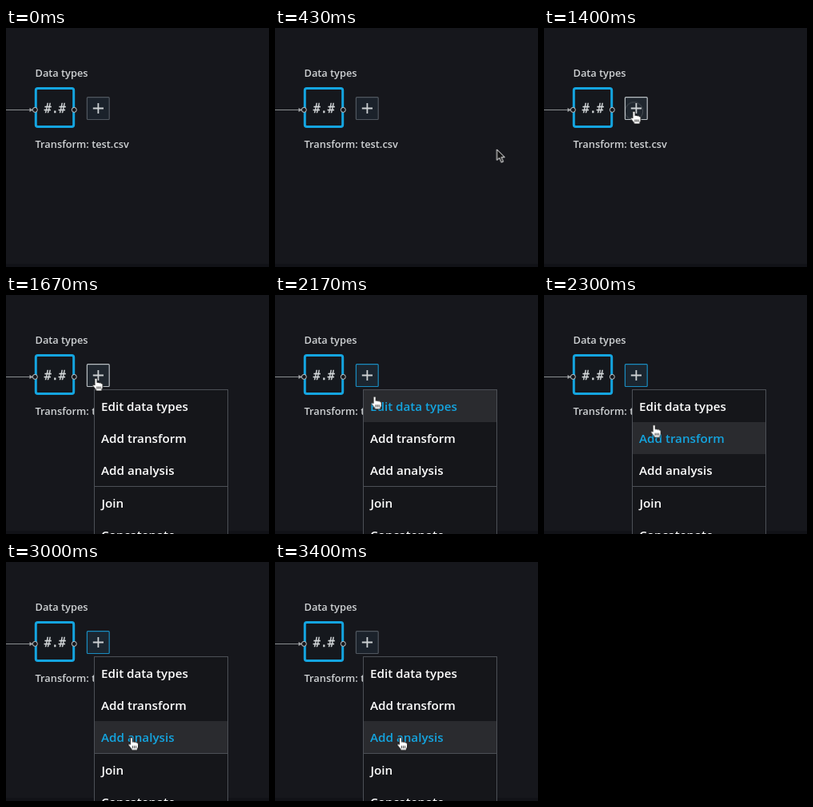
These frames come from a looping animation (329 by 299 pixels, 3610 ms). An HTML page:

```html
<!DOCTYPE html>
<html lang="en">
<head>
<meta charset="utf-8">
<title>Data flow: add analysis</title>
<style>
  html, body { margin: 0; width: 100%; height: 100%; overflow: hidden; background: #16171c; }
  svg { display: block; width: 329px; height: 299px; }
  text { font-family: "Open Sans", "Noto Sans", sans-serif; font-weight: 600; }
  .label { font-size: 12.8px; fill: #cfd2d4; }
  .code { font: 15px "DejaVu Sans Mono", monospace; fill: #d5d9db; stroke: #d5d9db; stroke-width: .3; }
  .item { font-size: 15.2px; fill: #fff; }
  .hover rect { fill: #2a2b2f; }
  .hover .item { fill: #14a5e0; }
  .port { fill: #16171c; stroke: #c5c9cb; }

  /* One shared 3610 ms timeline */
  .timed { animation: 3610ms step-end infinite; }
  .button { fill: #1b222b; stroke: #50575f; stroke-width: 1.2; animation-name: button; }
  .menu { animation-name: menu; }
  .edit { animation-name: edit; }
  .transform { animation-name: transform; }
  .analysis { animation-name: analysis; }
  .arrow { animation-name: arrow; }
  .grab { animation-name: grab; }
  .point { animation-name: point; }
  .cursor { animation-name: travel; }
  .ripple { fill: none; stroke: #fff; stroke-width: 1.5; opacity: 0; animation-name: ripple; }

  @keyframes travel {
    0%, 6.371% { transform: translate(325px, 187px); animation-timing-function: cubic-bezier(.4, .1, .7, .5); }
    11.911% { transform: translate(278px, 152px); animation-timing-function: cubic-bezier(.33, .37, .67, 1); }
    20.222% { transform: translate(152px, 115px); }
    22.161% { transform: translate(152px, 115px); animation-timing-function: cubic-bezier(.5, 0, .7, 1); }
    29.64% { transform: translate(112.5px, 104px); }
    56.233% { transform: translate(112.5px, 104px); animation-timing-function: cubic-bezier(.4, 0, .75, .6); }
    60.111% { transform: translate(124.5px, 126.5px); animation-timing-function: cubic-bezier(.35, .36, .75, .97); }
    70.083% { transform: translate(156px, 212px); }
    71.191% { transform: translate(156px, 212px); animation-timing-function: cubic-bezier(.333, 0, .667, 1); }
    78.393%, 100% { transform: translate(157px, 219.5px); }
  }
  @keyframes arrow {
    0%, 16.62%, 100% { visibility: hidden; }
    6.371% { visibility: visible; }
  }
  @keyframes grab {
    0%, 26.87%, 100% { visibility: hidden; }
    16.62% { visibility: visible; }
  }
  @keyframes point {
    0% { visibility: hidden; }
    26.87%, 100% { visibility: visible; }
  }
  @keyframes button {
    0%, 89.474%, 100% { fill: #1b222b; stroke: #50575f; }
    26.87% { fill: #20272f; stroke: #b9bfc3; }
    59.003% { fill: #1b2630; stroke: #1a8cc0; }
  }
  @keyframes menu {
    0% { visibility: hidden; }
    46.26%, 100% { visibility: visible; }
  }
  @keyframes edit {
    0%, 63.213%, 100% { visibility: hidden; }
    59.335% { visibility: visible; }
  }
  @keyframes transform {
    0%, 67.036%, 100% { visibility: hidden; }
    63.213% { visibility: visible; }
  }
  @keyframes analysis {
    0% { visibility: hidden; }
    67.036%, 100% { visibility: visible; }
  }
  @keyframes ripple {
    0%, 41.551%, 92.327%, 100% { opacity: 0; transform: scale(1); }
    38.781%, 88.643% { opacity: .35; transform: scale(.35); animation-timing-function: ease-out; }
  }
</style>
</head>
<body>
<svg viewBox="0 0 329 299">
  <defs>
    <path id="palm" d="M-3.6 0L-4.4 -4.5M-1 -1V-5.6M2 -1L2.4 -5.3M4.6 0L5.4 -3.4M-3 4L-6 1M-3.6 0H4.8V3L3 5.8H-2L-4 3Z"/>
  </defs>
  <rect width="329" height="299" fill="#16171c"/>
  <rect y="295" width="329" height="4" fill="#111217"/>

  <path d="M0 102.5H33" stroke="#8b8e91"/>
  <path d="M29.5 100L34 102.5L29.5 105Z" fill="#a3a6a8"/>
  <text class="label" x="36.5" y="61">Data types</text>
  <text class="label" x="36.5" y="150">Transform: test.csv</text>

  <rect x="37.3" y="75.5" width="47.4" height="48" rx="2.5" fill="#15181d" stroke="#14a5e0" stroke-width="3"/>
  <text class="code" x="47.8" y="105.6">#.#</text>
  <circle class="port" cx="36.3" cy="102.4" r="3"/>
  <circle class="port" cx="85.3" cy="102.4" r="3"/>

  <rect class="timed button" x="101.4" y="86.7" width="27.8" height="27.8" rx="1"/>
  <path d="M108.8 100.5H122M115.4 94V107" stroke="#cdd1d3" stroke-width="1.8"/>

  <g class="timed menu">
    <rect x="110.5" y="118.5" width="167" height="190" fill="#15161a" stroke="#4c5056"/>
    <path d="M111 239.5H277" stroke="#4c5056"/>
    <text class="item" x="119" y="145">Edit data types</text>
    <text class="item" x="119" y="185">Add transform</text>
    <text class="item" x="119" y="225">Add analysis</text>
    <text class="item" x="119.5" y="266">Join</text>
    <text class="item" x="119" y="306">Concatenate</text>
  </g>
  <g class="timed hover edit">
    <rect x="111" y="119" width="166" height="40"/>
    <text class="item" x="119" y="145">Edit data types</text>
  </g>
  <g class="timed hover transform">
    <rect x="111" y="159" width="166" height="40"/>
    <text class="item" x="119" y="185">Add transform</text>
  </g>
  <g class="timed hover analysis">
    <rect x="111" y="199" width="166" height="40"/>
    <text class="item" x="119" y="225">Add analysis</text>
  </g>

  <g class="timed cursor">
    <circle class="timed ripple" r="31"/>
    <path class="timed arrow" d="M0 0V13.5L3.2 10.6L5.6 16.2L8 15.2L5.6 9.8H9.8Z" fill="#111" stroke="#fff"/>
    <g class="timed grab" stroke-linecap="round" stroke-linejoin="round">
      <use href="#palm" fill="#111" stroke="#111" stroke-width="3.6"/>
      <use href="#palm" fill="#fff" stroke="#fff" stroke-width="1.9"/>
    </g>
    <g class="timed point" stroke="#111" stroke-width=".9" stroke-linejoin="round">
      <path d="M-1.6 1.6A1.6 1.6 0 0 1 1.6 1.6V5.6Q3 4.4 4.2 6Q5.7 5 6.7 6.6Q8.6 6 8.6 8.6V11Q8.4 13 7.4 14.2V16H0V14.6Q-1.6 12.6 -4 9.4Q-4.4 7.6 -2.8 7.8L-1.6 9Z" fill="#fff"/>
      <path d="M1.4 10.5V13.5M3.5 10.5V13.5M5.6 10.5V13.5" fill="none"/>
    </g>
  </g>
</svg>
</body>
</html>
```
